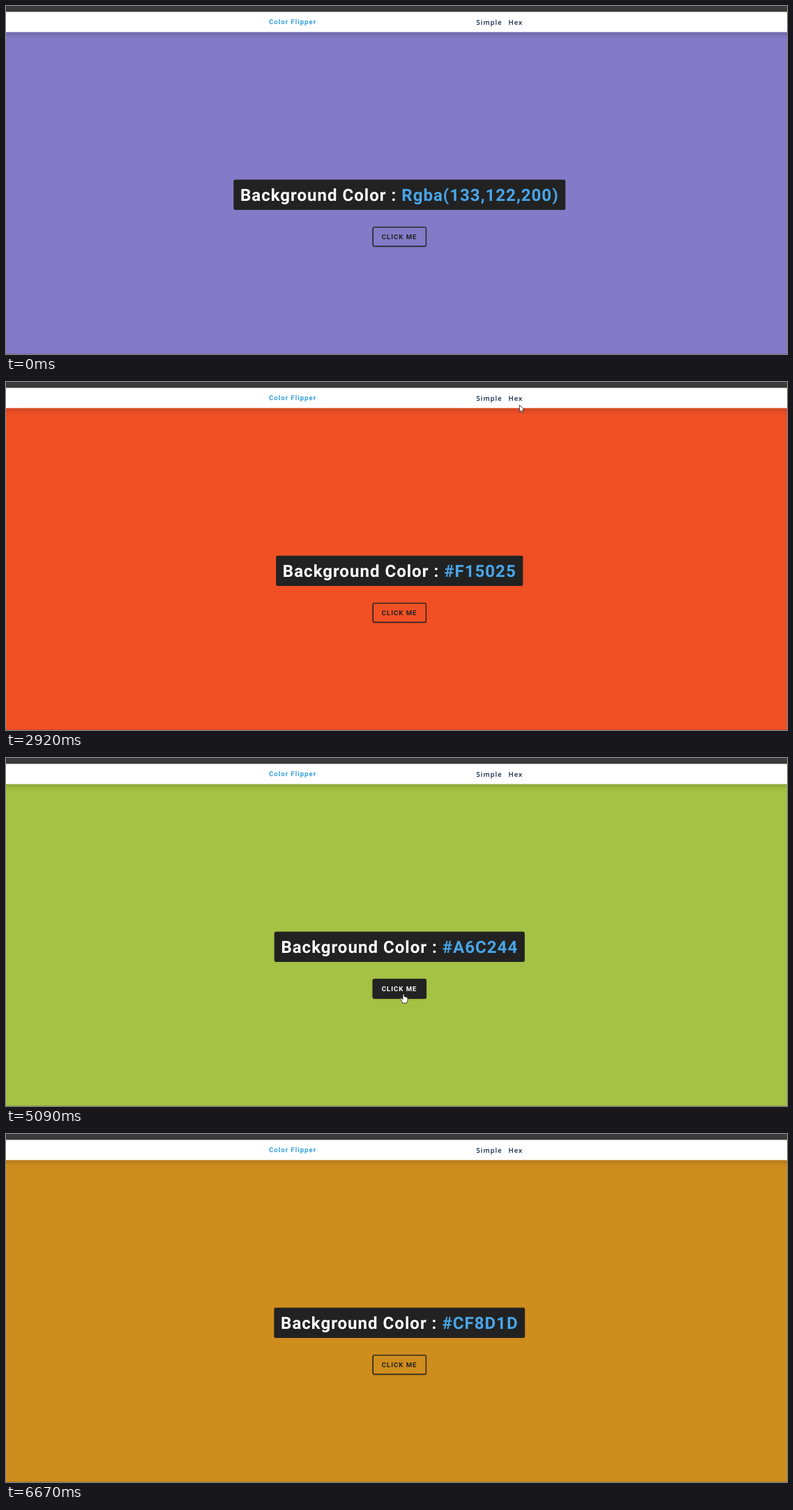
An HTML page that plays this animation: 1120 by 500 pixels, repeating every 7.01 s.

```html
<!DOCTYPE html>
<html lang="en">
<head>
<meta charset="utf-8">
<title>Color Flipper</title>
<style>
  html, body { margin: 0; width: 100%; height: 100%; overflow: hidden; }
  svg { display: block; width: 1120px; height: 500px; }
  text { font: 700 9.65px Roboto, sans-serif; letter-spacing: .965px; white-space: pre;
    text-rendering: geometricPrecision; }
  #brand { fill: #329fe6; }
  .link { font-family: "Open Sans", sans-serif; font-weight: 600; fill: #0c2447; }
  .link.hover, #name { fill: #49a6e9; }
  #head { font-size: 24.12px; fill: #fff; }
  #btn rect { fill: none; stroke: #222; stroke-width: 1.3px; }
  #btn text { fill: #222; }
  #btn.hover rect { fill: #222; }
  #btn.hover text { fill: #fff; }
</style>
</head>
<body>
<svg viewBox="0 0 1120 500">
  <defs>
    <filter id="navShadow" filterUnits="userSpaceOnUse" x="-40" y="-20" width="1200" height="90">
      <feDropShadow dx="0" dy="3" stdDeviation="4.5" flood-opacity=".2"/>
    </filter>
    <filter id="btnShadow">
      <feDropShadow dx="0" dy=".6" stdDeviation=".9" flood-opacity=".2"/>
    </filter>
    <clipPath id="outside">
      <path clip-rule="evenodd" d="M510 300H620V365H510ZM526 317.6H602.7V345.6H526Z"/>
    </clipPath>
  </defs>
  <rect id="page" width="1120" height="500"/>
  <rect y="499" width="1120" height="1" fill-opacity=".14"/>
  <rect x="-30" width="1180" height="37.4" fill="#fff" filter="url(#navShadow)"/>
  <rect width="1120" height="8.4" fill="#3b3a39"/>
  <text id="brand" x="377" y="25.9">Color Flipper</text>
  <text class="link" x="674.5" y="26.5">Simple</text>
  <text class="link" id="hex" x="720.6" y="26.5">Hex</text>
  <rect id="box" y="249.6" height="43.5" rx="2.4" fill="#222"/>
  <text id="head" y="279.7">Background Color : <tspan id="name"></tspan></text>
  <g clip-path="url(#outside)">
    <rect x="525.7" y="317.3" width="77.3" height="28.6" rx="2.4" fill="#222" filter="url(#btnShadow)"/>
  </g>
  <g id="btn">
    <rect x="526.35" y="317.95" width="76" height="27.3" rx="1.8"/>
    <text x="538.8" y="334.9">CLICK ME</text>
  </g>
  <g id="cursor">
    <circle id="press" cy=".5" r="7.3" fill="#d7c300" fill-opacity=".65"/>
    <g transform="scale(.6)" fill="#fff" stroke="#111" stroke-width="1.3" stroke-linejoin="round">
      <path id="arrow" d="M0 0V17L4 13.4L6.6 19.2L9.4 18L6.8 12.2H12Z"/>
      <path id="hand" d="M-1.7 1.7Q-1.7 0 0 0Q1.7 0 1.7 1.7V6.5Q3 5.4 4.6 7Q6 6.3 7.3 8Q10 7.8 10 10V14.5Q10 17.5 8 19.5V22H-2.6V19.5L-7 12.5Q-8 10.2 -6.3 9.7Q-5 9.6 -3.4 12L-1.7 13.4Z"/>
    </g>
  </g>
</svg>
<script>
const LOOP = 7010, STEP = 68.5, MIDDLE = 564.3, PAD = 9.65;
const ENTER = 230, NAV_CLICK = 3260, LOADED = 3340, RESUME = 3530, LEAVE = 6665;
const $ = id => document.getElementById(id);

// Each label is also the CSS colour of the page
const simple = ['Rgba(133,122,200)', 'Green', '#F15025'];
const hex = ['#F1f5f8', '#999BE7', '#A6C244', '#3F3C22', '#CF8D1D'];
const simpleClick = i => 700 + 630 * i;
const hexClick = i => 3350 + 710 * i;
const flips = [
  ...simple.map((label, i) => ({ label, time: i ? simpleClick(i) : 0 })),
  ...hex.map((label, i) => ({ label, time: i ? hexClick(i) : NAV_CLICK }))
];

// The pointer rests at each spot until the next trip starts
const gate = { x: 1014, y: 488 }, btnEdge = { x: 600.5, y: 335 };
const hexLink = { x: 736, y: 27.5 }, btnLow = { x: 570, y: 339 };
const trips = [
  { start: ENTER, end: 880, from: gate, to: btnEdge, bend: 0, power: 3 },
  { start: 2480, end: 3050, from: btnEdge, to: hexLink, bend: 80, power: 3 },
  { start: RESUME, end: 3950, from: hexLink, to: btnLow, bend: 0, power: 3 },
  { start: 6490, end: 6610, from: btnLow, to: gate, bend: 0, power: 1 }
];

// The pointer moves in even steps, counted anew after the pause
function tick(t) {
  const base = t < RESUME ? ENTER : RESUME;
  return base + Math.floor((t - base) / STEP + .1) * STEP;
}

function pointer(t) {
  const { start, end, from, to, bend, power } = trips.filter(p => p.start <= t).pop() || trips[0];
  const k = Math.min(1, Math.max(0, (t - start) / (end - start)));
  const e = 1 - (1 - k) ** power;
  return {
    x: from.x + (to.x - from.x) * e + 2 * bend * e * (1 - e),
    y: from.y + (to.y - from.y) * e
  };
}

function setLabel(label) {
  if ($('name').textContent === label) return;
  $('name').textContent = label;
  $('page').setAttribute('fill', label);
  const width = $('head').getComputedTextLength();
  $('head').setAttribute('x', MIDDLE - width / 2);
  $('box').setAttribute('x', MIDDLE - width / 2 - PAD);
  $('box').setAttribute('width', width + 2 * PAD);
}

const show = (id, on) => $(id).setAttribute('visibility', on ? 'inherit' : 'hidden');

function draw(t) {
  setLabel(flips.filter(f => f.time <= t).pop().label);

  const { x, y } = pointer(tick(t));
  const visible = t >= ENTER && t < LEAVE;
  const onBtn = visible && x > 526 && x < 603 && y > 317 && y < 346;
  const onHex = visible && y < 29 && t < LOADED;
  const pressed = flips.some(f => f.time && t >= f.time - 140 && t < f.time + 70);

  $('btn').classList.toggle('hover', onBtn);
  $('hex').classList.toggle('hover', onHex);
  $('cursor').setAttribute('transform', `translate(${x} ${y})`);
  show('cursor', visible);
  show('press', pressed);
  show('hand', onBtn || onHex);
  show('arrow', !onBtn && !onHex);
}

const begin = performance.now();
function frame() {
  draw((performance.now() - begin) % LOOP);
  requestAnimationFrame(frame);
}
frame();
</script>
</body>
</html>
```
